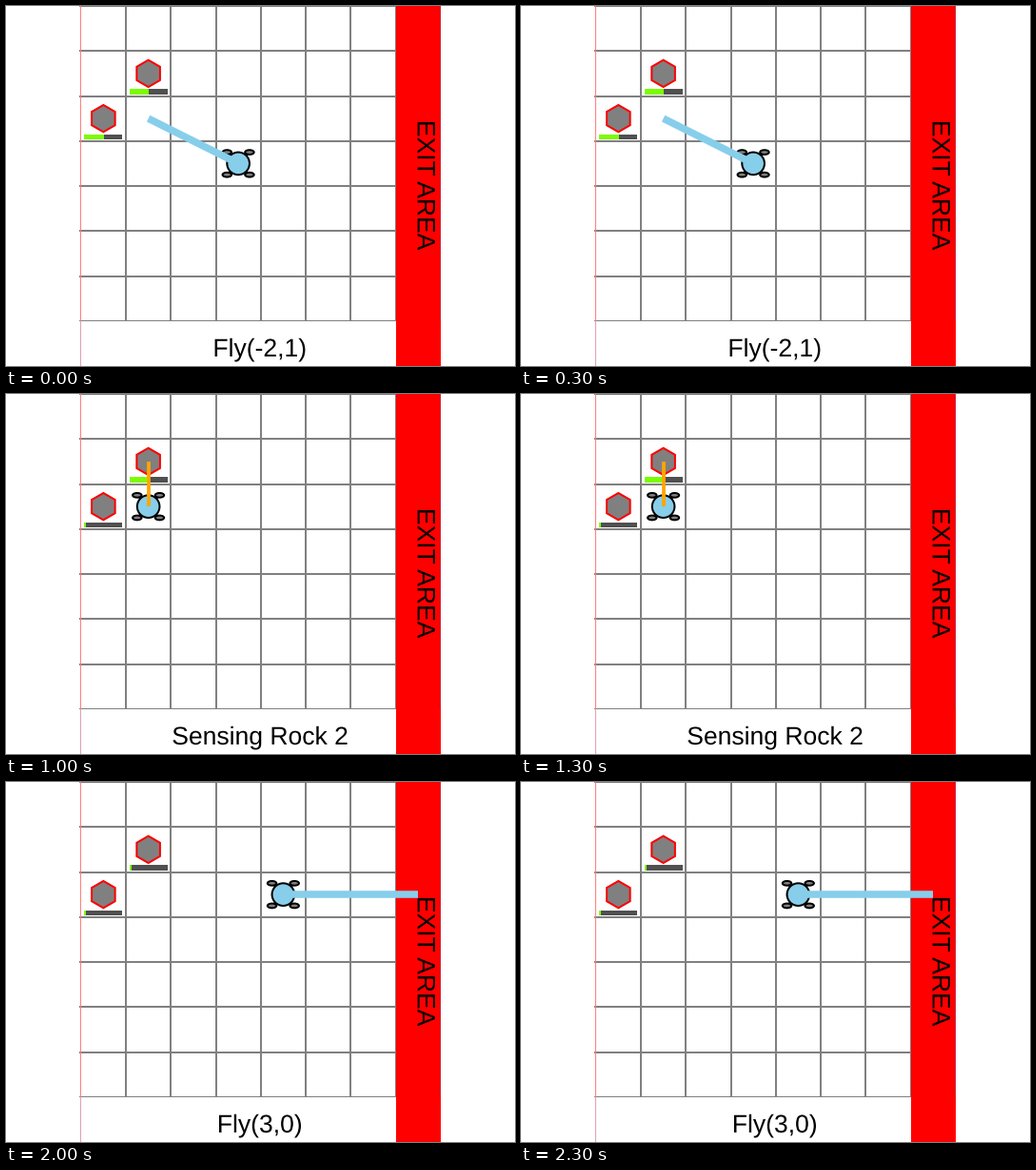
Write a matplotlib script that moves like this. It is 535 px wide and 378 px high and loops after 2500 ms.

```python
import math

import matplotlib.pyplot as plt
from matplotlib.animation import FuncAnimation
from matplotlib.patches import Circle, Ellipse, PathPatch, Rectangle, RegularPolygon
from matplotlib.textpath import TextPath
from matplotlib.transforms import Affine2D

W, H, DPI = 535, 378, 100
CELL = 47.25
LEFT, COLS, ROWS = 78.75, 7, 7
RIGHT, BOTTOM = LEFT + COLS * CELL, ROWS * CELL
PX = 72 / DPI  # points per pixel
FONT_SIZE = 26.5
FULL, SENSED = 0.52, 0.05
ROCKS = [(0, 2), (1, 1)]

# caption, drone cell, beam end (column, row), beam kind, rock levels
STEPS = [
    ("Fly(-2,1)", (3, 3), (1, 2), "fly", (FULL, FULL)),
    ("Sensing Rock 1", (1, 2), (0, 2), "sense", (FULL, FULL)),
    ("Sensing Rock 2", (1, 2), (1, 1), "sense", (SENSED, FULL)),
    ("Fly(3,0)", (1, 2), (4, 2), "fly", (SENSED, SENSED)),
    ("Fly(3,0)", (4, 2), (7, 2), "fly", (SENSED, SENSED)),
]
BEAMS = {"fly": ("skyblue", 7.6), "sense": ("orange", 3.8)}

fig = plt.figure(figsize=(W / DPI, H / DPI), dpi=DPI, facecolor="white")
ax = fig.add_axes([0, 0, 1, 1])
ax.set_xlim(0, W)
ax.set_ylim(H, 0)
ax.axis("off")


def center(cell):
    return LEFT + (cell[0] + 0.5) * CELL, (cell[1] + 0.5) * CELL


def box(x, y, w, h, color, z, smooth=True):
    return ax.add_patch(Rectangle((x, y), w, h, fc=color, lw=0, zorder=z,
                                  antialiased=smooth))


def line(x, y, color, width, z):
    return ax.plot(x, y, color=color, lw=width * PX, zorder=z,
                   solid_capstyle="butt")[0]


def text_shape(text):
    """Text outline with its ink starting at x = 0 on the baseline."""
    path = TextPath((0, 0), text, size=FONT_SIZE, prop={"family": "Liberation Sans"})
    ink = path.get_extents()
    return path.transformed(Affine2D().translate(-ink.x0, 0)), ink.width


def draw_board():
    for k in range(1, COLS + 1):
        x = LEFT + k * CELL
        line([x, x], [0, BOTTOM], "gray", 2, 1)
    for k in range(ROWS + 1):
        line([LEFT - 1.5, RIGHT], [k * CELL] * 2, "gray", 2, 1)
    box(0, 331, W, H - 331, "white", 2)
    box(78, 0, 1, 331, "#ff7f7f", 2)
    box(78, 331, 1, H - 331, "#e0a0b4", 3)
    box(RIGHT, 0, CELL, H, "red", 3)
    box(456, 0, 1, 331, "#c02030", 4)
    shape, width = text_shape("EXIT AREA")
    turn = Affine2D().scale(1, -1).rotate_deg(90).translate(432.6, 189.2 - width / 2)
    ax.add_patch(PathPatch(shape.transformed(turn), fc="black", lw=0, zorder=9))


def draw_rock(cell):
    x, y = center(cell)
    ax.add_patch(RegularPolygon((x, y), 6, radius=0.3 * CELL, fc="gray", ec="red",
                                lw=2 * PX, zorder=5))
    box(x - 20.1, y + 16.4, 40.2, 5.4, "#505050", 5)
    return box(x - 20.1, y + 16.4, 0, 5.4, "lawngreen", 6)


def draw_drone():
    r = CELL / 4
    style = dict(ec="black", lw=2 * PX)
    parts = []
    for sx in (-1, 1):
        for sy in (-1, 1):
            parts.append(line([0, sx * r], [0, sy * r], "black", 2, 6))
            parts.append(ax.add_patch(Ellipse((sx * r, sy * r), CELL / 5, CELL / 10,
                                              fc="gray", zorder=6.5, **style)))
    parts.append(ax.add_patch(Circle((0, 0), r, fc="skyblue", zorder=7, **style)))
    return parts


draw_board()
levels = [draw_rock(cell) for cell in ROCKS]
drone = draw_drone()
beam = line([], [], "skyblue", 1, 8)
caption = ax.add_patch(PathPatch(text_shape("Fly")[0], fc="black", lw=0, zorder=9))


def update(i):
    text, cell, goal, kind, amounts = STEPS[i]
    x, y = center(cell)
    gx, gy = center(goal)
    for part in drone:
        part.set_transform(Affine2D().translate(x, y) + ax.transData)
    # patches carry their own shape transform, which set_transform keeps
    color, width = BEAMS[kind]
    beam.set_data([x, gx], [y, gy])
    beam.set_color(color)
    beam.set_linewidth(width * PX)
    for bar, amount in zip(levels, amounts):
        bar.set_width(40.2 * amount)
    shape, length = text_shape(text)
    place = Affine2D().scale(1, -1).translate(267 - length / 2, 368)
    caption.set_path(shape.transformed(place))
    return [*drone, *levels, beam, caption]


anim = FuncAnimation(fig, update, frames=len(STEPS), interval=500, repeat=True,
                     repeat_delay=0, blit=False)
plt.show()
```
